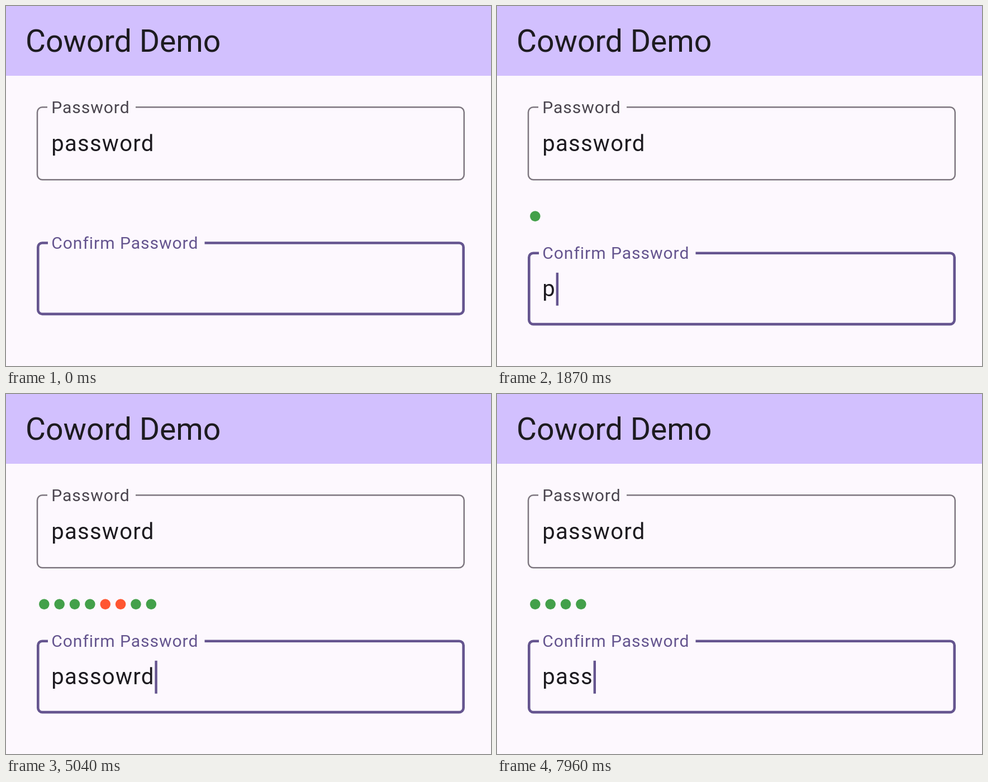
These frames come from a looping animation (868 px wide and 645 px high, 8 s). An HTML page:

```html
<!DOCTYPE html>
<html lang="en">
<head>
<meta charset="utf-8">
<title>Coword Demo</title>
<style>
  html, body { margin: 0; width: 100%; height: 100%; overflow: hidden; background: #fdf8fe; }
  svg { display: block; width: 100vw; height: 100vh; }
  text { font-family: Roboto, sans-serif; fill: #1d1b20; white-space: pre; }
  .title { font-size: 55.3px; }
  .value { font-size: 40.1px; letter-spacing: 1.25px; }
  .label { font-size: 30.1px; letter-spacing: .94px; }
  .box { fill: none; }
</style>
</head>
<body>
<svg viewBox="0 0 868 645">
  <rect width="868" height="645" fill="#fdf8fe"/>
  <rect width="868" height="125" fill="#d2c0fe"/>
  <text class="title" x="35" y="81.5">Coword Demo</text>

  <path id="box1" class="box" stroke="#7d767f" stroke-width="2.5"/>
  <text class="label" x="81.2" y="191.7" style="fill:#4a454e">Password</text>
  <text class="value" x="81.2" y="260">password</text>

  <g id="dots"></g>

  <g id="confirm">
    <path id="box2" class="box" stroke="#65558f" stroke-width="4.6"/>
    <text class="label" x="81.2" y="435.2" style="fill:#65558f">Confirm Password</text>
    <text id="entry" class="value" x="81.2" y="502.3"></text>
    <rect id="caret" y="459.6" width="4.4" height="59" fill="#65558f"/>
  </g>
</svg>
<script>
const LOOP = 8000, BLINK = 500, LEFT = 81.2;
const PASSWORD = 'password', TYPED = 'passowrd';
const $ = id => document.getElementById(id);

// [time, number of characters in the confirm field]
const keys = [
  [-750, 0], [1600, 1], [1960, 2], [2280, 3], [2500, 4],
  [3850, 5], [4250, 6], [4600, 7], [4920, 8],
  [6900, 7], [7200, 6], [7480, 5], [7740, 4]
];

// Rounded outline with a gap in its top edge for the label
function outline(l, t, r, b, gapStart, gapEnd, rad) {
  const arc = (x, y) => `A${rad} ${rad} 0 0 1 ${x} ${y}`;
  return `M${gapEnd} ${t}H${r - rad}${arc(r, t + rad)}V${b - rad}${arc(r - rad, b)}` +
    `H${l + rad}${arc(l, b - rad)}V${t + rad}${arc(l + rad, t)}H${gapStart}`;
}
$('box1').setAttribute('d', outline(56, 181.3, 819.8, 311.2, 74, 232, 9));
$('box2').setAttribute('d', outline(57.3, 424.5, 818.7, 551.9, 75, 355.5, 7.5));

const dots = [...TYPED].map((ch, i) => {
  const dot = document.createElementNS('http://www.w3.org/2000/svg', 'circle');
  dot.setAttribute('cx', 68.3 + 27.36 * i);
  dot.setAttribute('cy', 376.6);
  dot.setAttribute('r', 9.3);
  dot.setAttribute('fill', ch === PASSWORD[i] ? '#43a04a' : '#ff5531');
  $('dots').append(dot);
  return dot;
});

function draw(t) {
  const [since, count] = keys.filter(k => k[0] <= t).pop();
  const entry = $('entry');
  entry.textContent = TYPED.slice(0, count);
  dots.forEach((dot, i) => dot.style.display = i < count ? '' : 'none');
  $('confirm').setAttribute('transform', `translate(0 ${count ? 18.2 : 0})`);

  // The caret restarts its blink on every key press
  const on = Math.floor((t - since) / BLINK) % 2 === 0;
  const width = count ? entry.getComputedTextLength() : 0;
  $('caret').setAttribute('x', LEFT + width + 0.7);
  $('caret').style.display = on ? '' : 'none';
}

const start = performance.now();
function tick(now) {
  draw(Math.max(0, now - start) % LOOP);
  requestAnimationFrame(tick);
}
draw(0);
requestAnimationFrame(tick);
</script>
</body>
</html>
```
